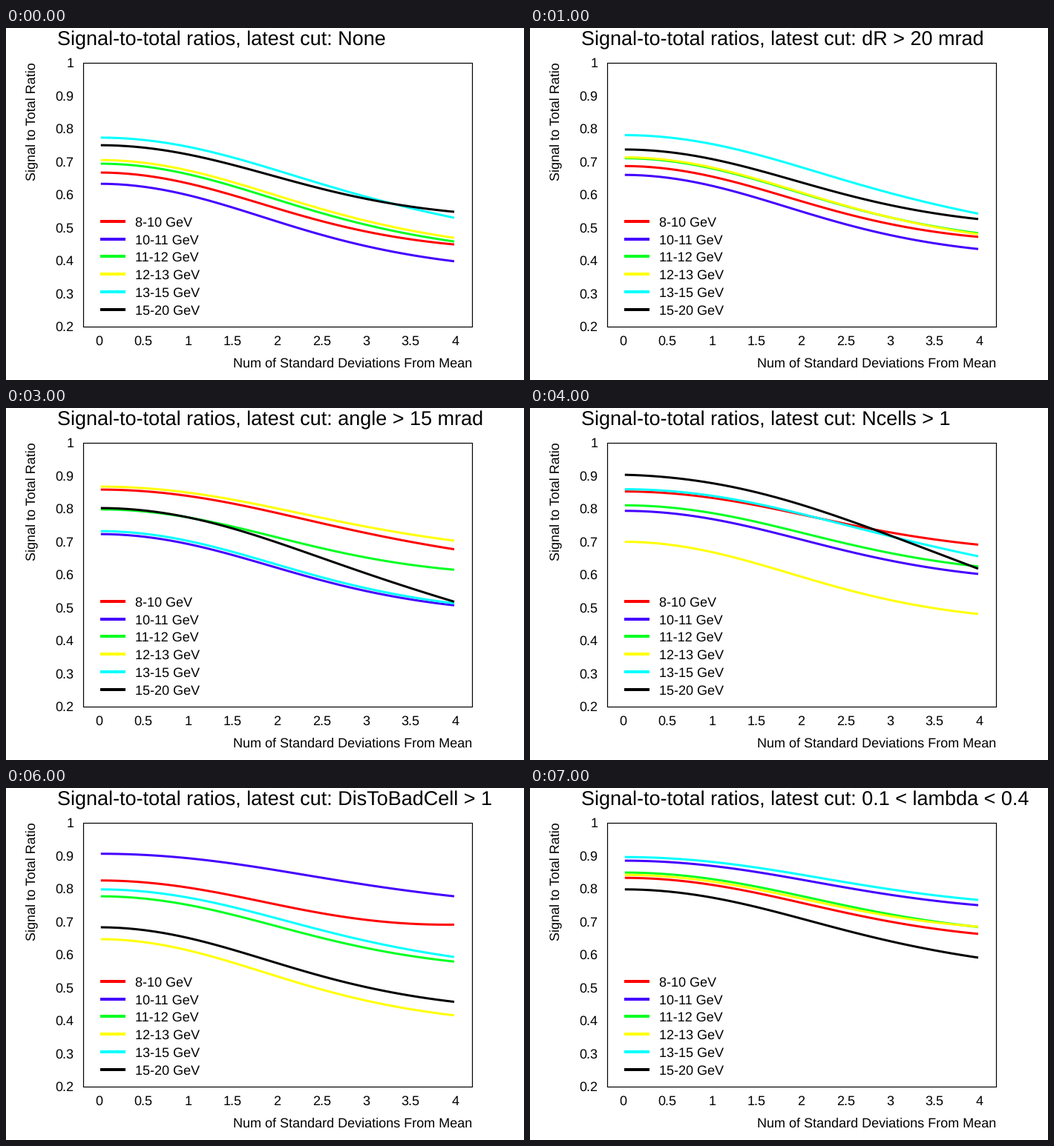
These frames come from a looping animation (698x475 px, 8 s). A matplotlib script:

```python
import math

import numpy as np
import matplotlib.pyplot as plt
from matplotlib.animation import FuncAnimation

W, H, DPI = 698, 475, 100
PT = 72 / DPI  # points per pixel

plt.rcParams["font.family"] = "Liberation Sans"
plt.rcParams["text.hinting"] = "none"

EDGES = [8, 10, 11, 12, 13, 15, 20]
COLORS = ["#ff0000", "#4400ff", "#00ff22", "#ffff00", "#00ffff", "#000000"]

# Signal ratio of each energy bin at zero and at the widest window.
NONE = [.665, .631, .692, .703, .771, .748], [.447, .396, .456, .467, .528, .546]
ASYMMETRY = [.764, .766, .775, .744, .809, .683], [.562, .582, .581, .522, .590, .436]
ANGLE = [.856, .721, .796, .865, .730, .800], [.675, .505, .613, .701, .511, .516]
BORDER = [.849, .807, .811, .661, .885, .923], [.692, .621, .625, .430, .685, .638]
BAD_CELL = [.823, .904, .775, .645, .796, .681], [.689, .775, .577, .414, .591, .455]
LAMBDA = [.831, .883, .847, .840, .894, .796], [.661, .748, .682, .683, .764, .589]


def mix(a, b, w):
    return (1 - w) * np.array(a) + w * np.array(b)


CUTS = [
    ("None", NONE),
    ("dR > 20 mrad", mix(NONE, ASYMMETRY, 0.2)),
    ("asymmetry < 0.7", ASYMMETRY),
    ("angle > 15 mrad", ANGLE),
    ("Ncells > 1", mix(ANGLE, BORDER, 0.82)),
    ("DisToBorder > 2", BORDER),
    ("DisToBadCell > 1", BAD_CELL),
    ("0.1 < lambda < 0.4", LAMBDA),
]

xs = np.linspace(0.015, 3.983, 41)
# Mean height of a Gaussian peak inside a window of +-x deviations.
peak = np.array([math.erf(x / math.sqrt(2)) / x for x in xs])
peak /= peak[0]


def odds(ratio):
    return ratio / (1 - ratio)


def ratio_curve(start, end):
    """Signal over total for a Gaussian peak on a sloping background."""
    slope = math.log(odds(end) / odds(start) / peak[-1])
    tilt = np.exp(slope * (xs / xs[-1]) ** (2 + 1.3 * slope))
    sig = odds(start) * peak * tilt
    return sig / (1 + sig)


def px(x):
    return 126 + 120 * x


def py(ratio):
    return 402 - 445 * (ratio - 0.2)


fig = plt.figure(figsize=(W / DPI, H / DPI), dpi=DPI, facecolor="white")
ax = fig.add_axes([0, 0, 1, 1])
ax.set_xlim(0, W)
ax.set_ylim(H, 0)
ax.axis("off")


def text(x, y, s, size=18, ha="left", **kw):
    return ax.text(x, y, s, fontsize=size * PT, ha=ha, va="baseline", color="black", **kw)


def line(x, y, color="black", width=1.0):
    return ax.plot(x, y, color=color, lw=width * PT, solid_capstyle="butt")[0]


left, right, top, bottom = 103.5, 627.5, 46.5, 402.5
line([left, right, right, left, left], [top, top, bottom, bottom, top], width=1.2)

for i in range(9):
    text(px(i / 2) - 0.7, 428.3, f"{i / 2:g}", ha="center")
    ratio = 0.2 + i / 10
    text(91.3, py(ratio) + 6.95, f"{ratio:.1g}", ha="right")

text(628, 458, "Num of Standard Deviations From Mean", ha="right")
text(39.5, 46, "Signal to Total Ratio", rotation=90, rotation_mode="anchor", ha="right")

for i, color in enumerate(COLORS):
    y = int(261.3 + 23.8 * i)
    line([127, 161], [y, y], color, 4)
    text(173.5, y + 7, f"{EDGES[i]}-{EDGES[i + 1]} GeV")

curves = [line(px(xs), 0 * xs, color, 3) for color in COLORS]
title = text(69.3, 23.2, "", size=27)


def draw(i):
    cut, (starts, ends) = CUTS[i]
    title.set_text("Signal-to-total ratios, latest cut: " + cut)
    for artist, start, end in zip(curves, starts, ends):
        artist.set_ydata(py(ratio_curve(start, end)))
    return [title, *curves]


anim = FuncAnimation(fig, draw, frames=len(CUTS), interval=1000, repeat=True, repeat_delay=0)
plt.show()
```
